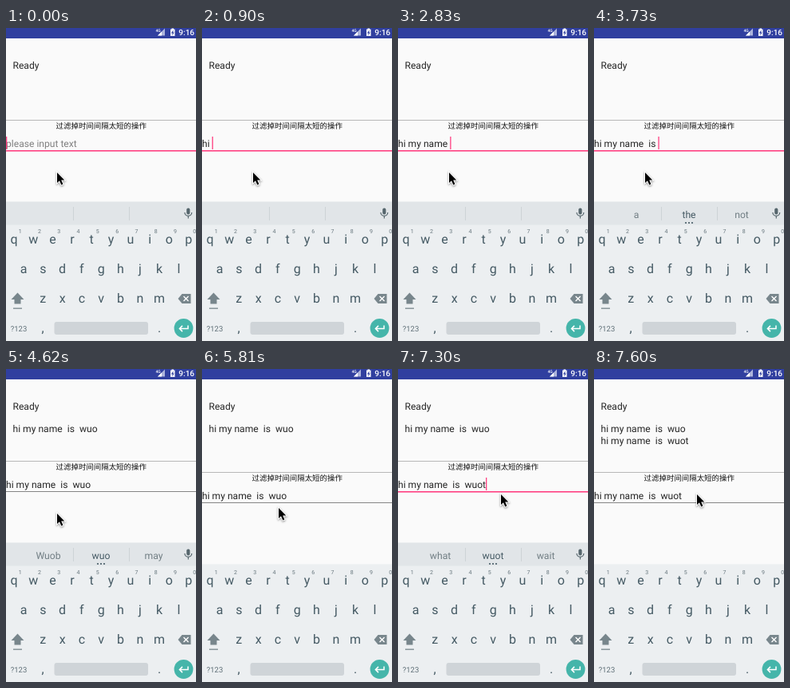
An HTML page with a canvas that plays this animation: 238x392 px, repeating every 8 s.

```html
<!DOCTYPE html>
<html lang="en">
<head>
<meta charset="utf-8">
<title>Debounced input</title>
<style>
  html, body { margin: 0; width: 100%; height: 100%; overflow: hidden; background: #fafafa; }
  canvas { display: block; width: 238px; height: 392px; }
</style>
</head>
<body>
<canvas id="stage"></canvas>
<script>
const W = 238, H = 392, LOOP = 8000;
const PINK = '#ff4081', TEXT = '#262626', INK = '#455a64', KEY_GREY = '#78868c';
const TEXT_SIZE = 12.1;
const canvas = document.getElementById('stage');
const ctx = canvas.getContext('2d');
const ratio = window.devicePixelRatio || 1;
canvas.width = W * ratio;
canvas.height = H * ratio;
ctx.textRendering = 'geometricPrecision';

// Each entry: time, field text, suggestions (left, middle, right)
const typing = [
  [0, '', ''],
  [300, 'h', ''],
  [450, 'h', 'he h hi'],
  [600, 'hi', 'his hi him'],
  [900, 'hi ', ''],
  [1050, 'hi m', ''],
  [1190, 'hi m', 'me m my'],
  [1340, 'hi my', 'may my mt'],
  [1490, 'hi my ', ''],
  [1640, 'hi my n', ''],
  [1790, 'hi my na', ''],
  [1930, 'hi my na', 'nap na name'],
  [2080, 'hi my nam', 'name nam same'],
  [2380, 'hi my name', ''],
  [2530, 'hi my name', 'named name names'],
  [2830, 'hi my name ', ''],
  [2980, 'hi my name ', 'is and was'],
  [3280, 'hi my name  ', ''],
  [3430, 'hi my name  is', ''],
  [3730, 'hi my name  is ', 'a the not'],
  [4030, 'hi my name  is  w', ''],
  [4180, 'hi my name  is  wu', ''],
  [4320, 'hi my name  is  wuo', 'Wuob wuo may'],
  [4760, 'hi my name  is  wuo', ''],
  [6700, 'hi my name  is  wuo', 'Wuob wuo may'],
  [7150, 'hi my name  is  wuot', 'Wuob wuo may'],
  [7300, 'hi my name  is  wuot', 'what wuot wait'],
];

const pointer = [
  [0, 63, 179], [5810, 95, 172], [5960, 122, 168], [6100, 139, 162], [6250, 128, 155],
];

const latest = (steps, t) => steps.filter(step => step[0] <= t).pop();
const between = (t, from, to) => t >= from && t < to;

function rect(x, y, w, h, color) {
  ctx.fillStyle = color;
  ctx.fillRect(x, y, w, h);
}

function disc(x, y, r, color) {
  ctx.fillStyle = color;
  ctx.beginPath();
  ctx.arc(x, y, r, 0, 2 * Math.PI);
  ctx.fill();
}

function roundRect(x, y, w, h, r, color) {
  ctx.fillStyle = color;
  ctx.beginPath();
  ctx.roundRect(x, y, w, h, r);
  ctx.fill();
}

function shape(d, x, y, fill, stroke, width = 1) {
  const path = new Path2D(d);
  ctx.save();
  ctx.translate(x, y);
  if (stroke) {
    ctx.strokeStyle = stroke;
    ctx.lineWidth = width;
    ctx.stroke(path);
  }
  if (fill) {
    ctx.fillStyle = fill;
    ctx.fill(path);
  }
  ctx.restore();
}

function label(text, x, y, size, color, align = 'left', family = 'Roboto', weight = 400) {
  ctx.font = `${weight} ${size}px ${family}, sans-serif`;
  ctx.textAlign = align;
  ctx.fillStyle = color;
  ctx.fillText(text, x, y);
}

function drawStatusBar() {
  rect(0, 0, W, 13, '#303f9f');
  shape('M0 9 L9 9 L9 0 Z', 190, 0.5, '#aeb5dc');
  shape('M0 5 L5 0 L5 5 Z', 190, 4.5, '#fff');
  label('4G', 187.5, 4.5, 5, '#fff', 'left', 'Roboto', 500);
  rect(207.5, 0.5, 2.5, 2, '#fff');
  rect(206, 1.5, 5.5, 8.5, '#fff');
  shape('M3 0 L0 4 L2 4 L1.5 7 L4 3 L2.5 3 Z', 206.7, 2.5, '#303f9f');
  label('9:16', 236, 9, 10, '#fff', 'right', 'Roboto', 500);
}

function drawPage(t, text, barShown) {
  const focused = t < 4620 || between(t, 6550, 7600);
  const shift = barShown ? 0 : 13.5;
  const lineY = y => Math.round(y + shift);

  label('Ready', 8.5, 51, TEXT_SIZE, TEXT);
  if (t >= 4620) label('hi my name  is  wuo', 8.5, 79.3, TEXT_SIZE, TEXT);
  if (t >= 7600) label('hi my name  is  wuot', 8.5, 93.5, TEXT_SIZE, TEXT);

  rect(0, lineY(115), W, 1, '#b8b8b8');
  label('过滤掉时间间隔太短的操作', 119.2, 126 + shift, 9.45, '#111', 'center', '"Noto Sans CJK SC", "Noto Sans CJK"');
  label(text || 'please input text', 0, 149 + shift, TEXT_SIZE, text ? TEXT : '#808080');
  rect(0, lineY(153.2), W, focused ? 1.6 : 1, focused ? PINK : '#858585');

  if (focused) {
    const caretX = text ? ctx.measureText(text).width : 0;
    rect(caretX, 136, 1.3, 16, PINK);
    if (between(t, 6550, 7150)) {
      shape('M0 -9 L5 -4.5 A7 7 0 1 1 -5 -4.5 Z', caretX + 0.5, 175, '#ff79a8');
    }
  }
}

function drawSuggestions(words) {
  rect(0, 217.5, W, 29, '#e1e5e8');
  rect(84, 224, 1, 17, '#cdd3d6');
  rect(154, 224, 1, 17, '#cdd3d6');
  if (words) {
    words.split(' ').forEach((word, i) =>
      label(word, 53 + 66 * i, 238, 12.2, i === 1 ? INK : '#717e84', 'center'));
    for (const x of [115, 119, 123]) disc(x, 244, 1.1, INK);
  }
  roundRect(226.2, 225.5, 4.2, 8, 2.1, '#56666d');
  shape('M-4.4 0 A4.4 4.4 0 0 0 4.4 0 M0 4.4 V7.5', 228.3, 231, null, '#56666d', 1.2);
}

function drawKeyboard() {
  rect(0, 244.5, W, H - 244.5, '#eceff1');
  const rows = [['qwertyuiop', 10, 270], ['asdfghjkl', 22, 307], ['zxcvbnm', 46.3, 344.3]];
  for (const [letters, x, y] of rows) {
    [...letters].forEach((letter, i) => label(letter, x + 24.3 * i, y, 16, INK, 'center'));
  }
  [...'1234567890'].forEach((digit, i) => label(digit, 17.6 + 24.3 * i, 257, 7, '#68777e', 'center'));

  shape('M0 -8 L8 0.5 H4 V6 H-4 V0.5 H-8 Z', 14.5, 339.5, KEY_GREY);
  rect(9, 350.5, 11, 1.3, KEY_GREY);
  shape('M0 6 L5 0 H16 V12 H5 Z', 215.5, 333, KEY_GREY);
  shape('M7 3 L13 9 M13 3 L7 9', 215.5, 333, null, '#fff', 1.4);

  label('?123', 16, 379.5, 9.5, '#607078', 'center');
  label(',', 46, 381, 16, INK, 'center');
  label('.', 192, 381, 16, INK, 'center');
  roundRect(60.5, 368, 117.5, 16, 3, '#cfd4d8');
  disc(222.5, 376, 11.9, '#45b5aa');
  shape('M5.5 -3.5 V0.5 H-5 M-1.5 -3.1 L-5.1 0.5 L-1.5 4.1', 222.5, 376, null, '#fff', 1.5);
}

function drawPointer(t) {
  const [, x, y] = latest(pointer, t);
  if (between(t, 6250, 6700)) {
    ctx.strokeStyle = '#e6e6e6';
    ctx.lineWidth = 1;
    ctx.beginPath();
    ctx.arc(x + 1, y + 1, 8, 0, 2 * Math.PI);
    ctx.stroke();
  }
  const arrow = 'M1 2 V15 L4 12.2 L6.3 17.5 L8.4 16.6 L6.2 11.4 H10.3 Z';
  ctx.save();
  ctx.shadowColor = 'rgba(0, 0, 0, 0.45)';
  ctx.shadowBlur = 2.5 * ratio;
  ctx.shadowOffsetY = ratio;
  shape(arrow, x, y, null, '#fff', 2);
  ctx.restore();
  shape(arrow, x, y, '#000');
}

function draw(t) {
  const [, text, words] = latest(typing, t);
  const barShown = t < 4760 || between(t, 6550, 7600);
  ctx.setTransform(ratio, 0, 0, ratio, 0, 0);
  rect(0, 0, W, H, '#fafafa');
  drawStatusBar();
  drawPage(t, text, barShown);
  drawKeyboard();
  if (barShown) drawSuggestions(words);
  drawPointer(t);
}

const start = performance.now();
function tick() {
  draw((performance.now() - start) % LOOP);
  requestAnimationFrame(tick);
}
tick();
</script>
</body>
</html>
```
